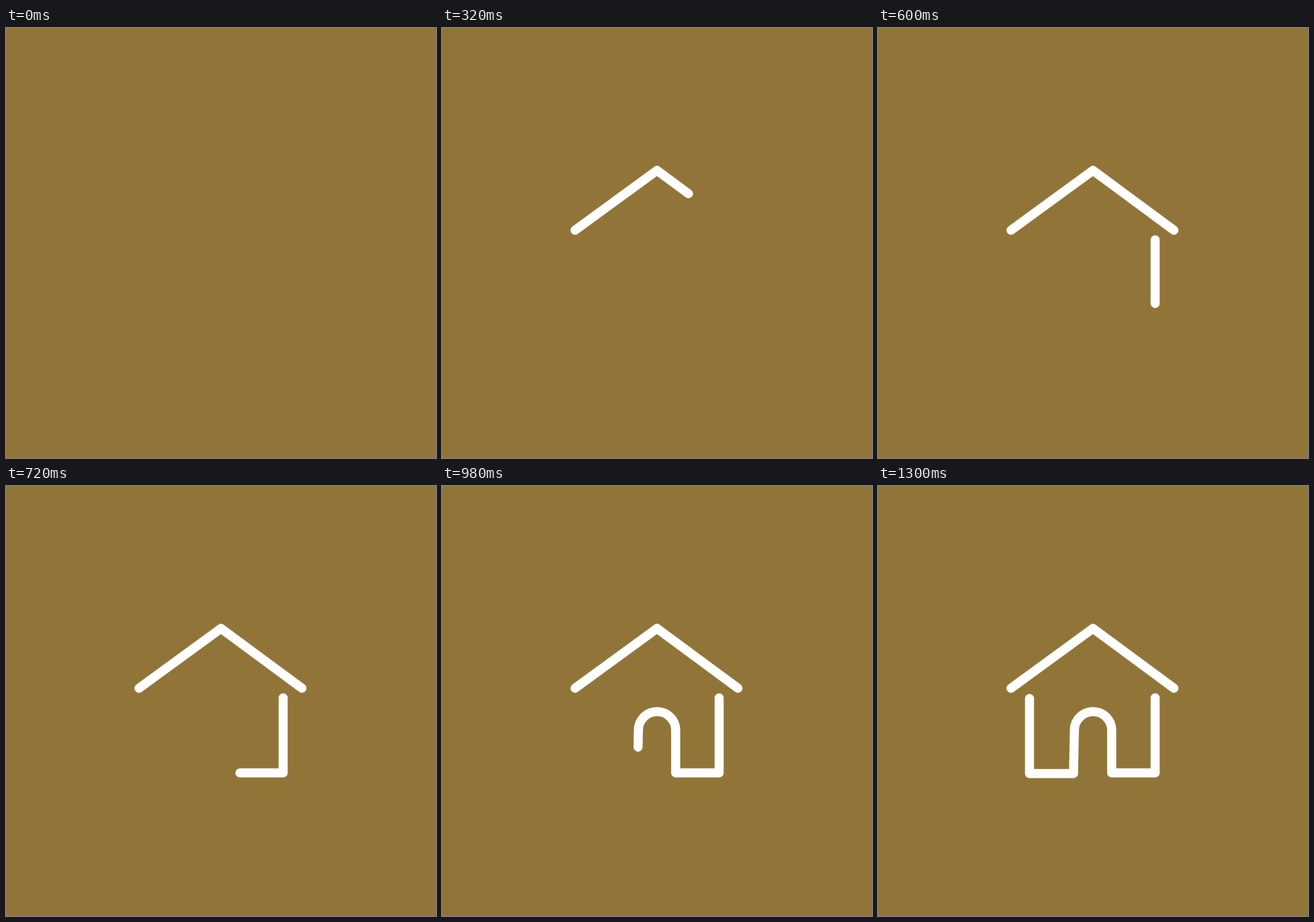
An HTML page for the animation above (2.22 s loop, 640 by 640 pixels).

```html
<!DOCTYPE html>
<html lang="en">
<head>
<meta charset="utf-8">
<title>House line drawing</title>
<style>
  html, body { margin: 0; height: 100%; overflow: hidden; background: #917538; }
  svg { display: block; width: 100%; height: 100%; }
  path { fill: none; stroke: #fff; stroke-width: 13.5; stroke-linecap: round; stroke-linejoin: round; visibility: hidden; }
</style>
</head>
<body>
<svg viewBox="0 0 640 640">
  <path id="roof" d="M198 301L320 212L440.5 301"/>
  <path id="walls" d="M412.5 315.3V427H347.8V363.5A27.75 27.75 0 0 0 292.3 363.5L291 428H225.5V316.3"/>
</svg>
<script>
  const LOOP = 2220, STEP = 20;
  const strokes = [
    { id: 'roof', start: 0, end: 460 },
    { id: 'walls', start: 460, end: 1300 }
  ].map(s => {
    const path = document.getElementById(s.id);
    return { ...s, path, length: path.getTotalLength() };
  });

  function draw(now) {
    const time = Math.floor((now % LOOP) / STEP) * STEP;
    for (const { path, start, end, length } of strokes) {
      const progress = Math.min(1, Math.max(0, (time - start) / (end - start)));
      path.style.visibility = progress > 0 ? 'visible' : 'hidden';
      path.style.strokeDasharray = progress < 1 ? `${progress * length} ${2 * length}` : 'none';
    }
  }

  const origin = performance.now();
  function tick() {
    draw(performance.now() - origin);
    requestAnimationFrame(tick);
  }
  tick();
</script>
</body>
</html>
```
